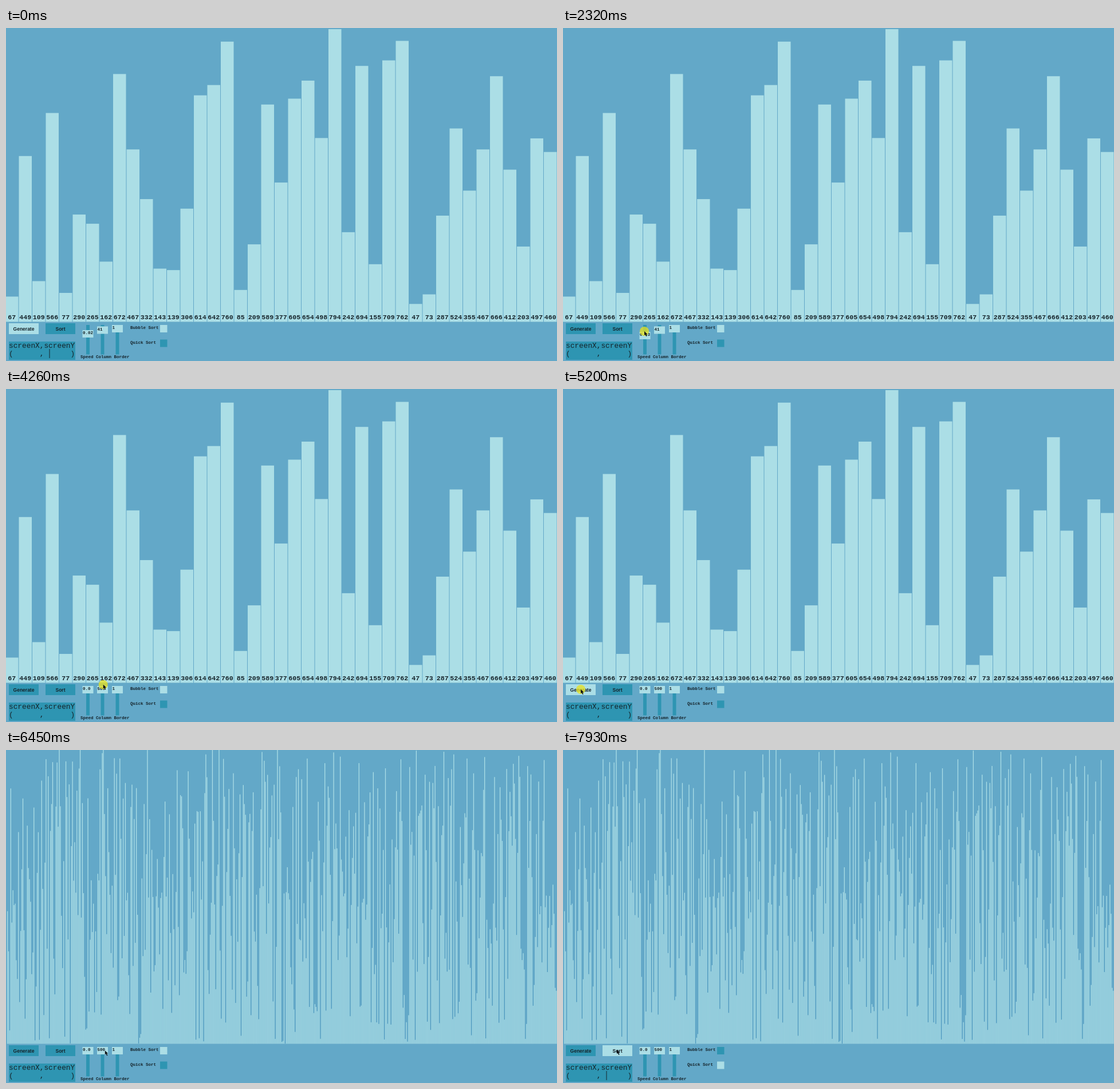
Animation, 962 px wide and 582 px high, one loop 8 s. Source, as an HTML page with a canvas:

```html
<!DOCTYPE html>
<html lang="en">
<head>
<meta charset="utf-8">
<title>Sorting visualiser</title>
<style>
html, body { margin: 0; width: 100%; height: 100%; overflow: hidden; background: #63a8c8; }
canvas { display: block; }
</style>
</head>
<body>
<canvas id="stage" width="962" height="582"></canvas>
<script>
const ctx = document.getElementById('stage').getContext('2d');
const BG = '#63a8c8', LIGHT = '#abdee6', DARK = '#2e95b2', INK = '#16242b';
const MONO = '"Liberation Mono", "Courier New", monospace';
const SANS = '"Liberation Sans", Arial, sans-serif';
const LOOP = 8000, FLOOR = 513.5, GENERATED = 5270, CHECKED = 7340;

// The column labels, which also set the heights
const values = [67, 449, 109, 566, 77, 290, 265, 162, 672, 467, 332, 143, 139, 306,
  614, 642, 760, 85, 209, 589, 377, 605, 654, 498, 794, 242, 694, 155, 709, 762, 47,
  73, 287, 524, 355, 467, 666, 412, 203, 497, 460];

// Pointer stops: [time, x, y]
const path = [[70, 888, 566], [840, 420, 449], [1540, 158, 535], [1790, 142, 533],
  [2320, 142, 530], [2710, 144, 518], [3400, 166, 525], [4430, 170, 516],
  [5200, 31, 525], [5500, 31, 525], [6290, 172, 525], [6840, 176, 526],
  [7320, 274, 551], [7930, 94, 524]];
const presses = [[1940, 2900], [3300, 4430], [5130, 5270], [7320, 7400]];

function ease(t, start, end) {
  const u = Math.min(1, Math.max(0, (t - start) / (end - start)));
  return u * u * (3 - 2 * u);
}

function pointerAt(t) {
  if (t < path[0][0]) return [-50, -50];
  let [, x, y] = path[0];
  for (let i = 1; i < path.length; i++) {
    const k = ease(t, path[i - 1][0], path[i][0]);
    x += (path[i][1] - x) * k;
    y += (path[i][2] - y) * k;
  }
  return [x, y];
}

let seed = 11;
function random() {
  seed = (seed * 16807) % 2147483647;
  return seed / 2147483647;
}
const COUNT = 500, PITCH = 962 / COUNT;
const heights = Array.from({ length: COUNT }, () => FLOOR * 1.01 * random());

function box(x, y, w, h, color) {
  ctx.fillStyle = color;
  ctx.fillRect(x, y, w, h);
}

function text(s, x, y, font, align = 'left') {
  ctx.font = font;
  ctx.textAlign = align;
  ctx.fillStyle = INK;
  ctx.fillText(s, x, y);
}
const small = (s, x, y) => text(s, x, y, 'bold 7.5px ' + MONO);

function drawColumns(t) {
  if (t >= GENERATED) {
    heights.forEach((h, i) => box(i * PITCH, FLOOR - h, 1.3, h, LIGHT));
    return;
  }
  values.forEach((v, i) => {
    const h = 0.643 * v + 1;
    box(23.5 * i - 1, FLOOR - h, 22.5, h, LIGHT);
    text(v, 23.5 * i + 10.3, 509.3, 'bold 11.6px ' + MONO, 'center');
  });
}

function button(label, x, lit, [px, py]) {
  const hover = px >= x && px <= x + 52 && py >= 516 && py <= 535;
  box(x, 516, 52, 19, lit || hover ? LIGHT : DARK);
  text(label, x + 26, 529, 'bold 8.5px ' + SANS, 'center');
}

function slider(name, nameX, x, y, value) {
  box(x + 6.5, 519, 6, 51.5, DARK);
  box(x, y, 19, 13, LIGHT);
  small(value, x + 0.5, y + 7);
  small(name, nameX, 577);
}

function option(name, y, on) {
  small(name, 217, y + 7);
  box(269, y, 12.5, 13, on ? LIGHT : DARK);
}

function drawPointer(t, [x, y]) {
  if (presses.some(([a, b]) => t >= a && t < b)) {
    ctx.fillStyle = 'rgba(232, 226, 30, .75)';
    ctx.beginPath();
    ctx.arc(x, y, 8, 0, 7);
    ctx.fill();
  }
  ctx.fillStyle = '#0c1216';
  ctx.beginPath();
  for (const [dx, dy] of [[0, 0], [0, 7], [1.7, 5.7], [3.2, 9], [4.6, 8.3], [3.2, 5.3], [5.4, 5.2]])
    ctx.lineTo(x + dx, y + dy);
  ctx.fill();
}

function draw(t) {
  const pointer = pointerAt(t);
  box(0, 0, 962, 582, BG);
  drawColumns(t);

  button('Generate', 5, t < path[0][0], pointer);
  button('Sort', 69, false, pointer);

  box(5, 548, 116, 32, DARK);
  text('screenX,screenY', 5, 559, '12.8px ' + MONO);
  text('(      ,      )', 5, 573, '12.8px ' + MONO);
  if (t < 150 || (t + 720) % 1040 < 520) box(75.5, 561, 1, 16, INK);

  const speedY = 528 + 3 * ease(t, 1940, 2320) - 12 * ease(t, 2320, 2650);
  const speed = (speedY - 519) / 450;
  const grow = ease(t, 3640, 4000);
  slider('Speed', 130, 133.5, speedY, speed < 0.005 ? '0.0' : speed.toFixed(2));
  slider('Column', 157, 159, 521.5 - 2.5 * grow, Math.round(41 + (COUNT - 41) * grow));
  slider('Border', 188.5, 185, 519, '1');

  option('Bubble Sort', 519, t < CHECKED);
  option('Quick Sort', 544.5, t >= CHECKED);
  drawPointer(t, pointer);
}

function frame() {
  draw(performance.now() % LOOP);
  requestAnimationFrame(frame);
}
frame();
</script>
</body>
</html>
```
